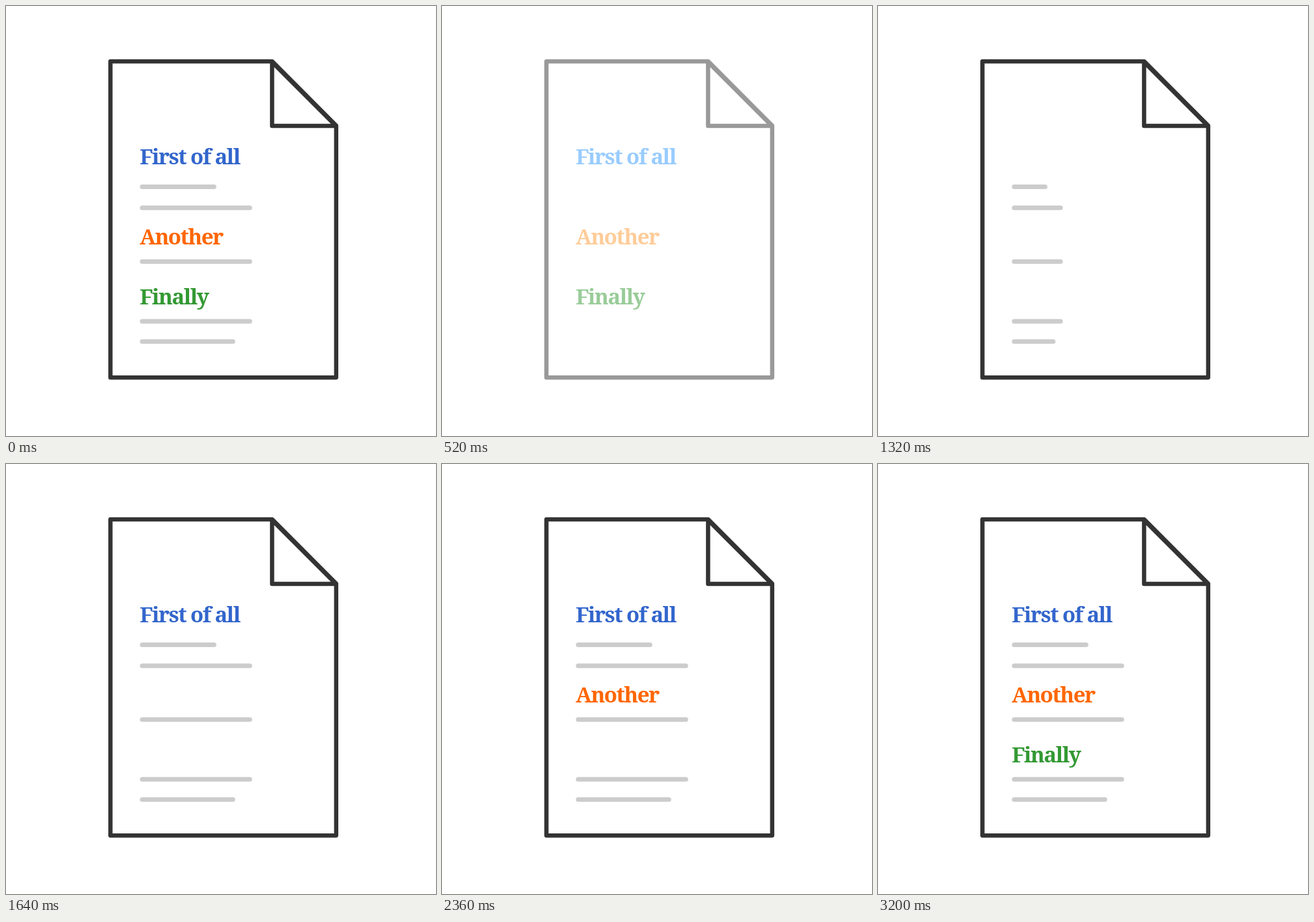
Recreate the animation shown at these times as an HTML page. Size 660 px wide and 660 px high, loop 5080 ms.

```html
<!DOCTYPE html>
<html lang="en">
<head>
<meta charset="utf-8">
<title>Document outline</title>
<style>
  html, body { margin: 0; width: 100%; height: 100%; overflow: hidden; background: #fff; }
  svg { display: block; width: 100%; height: 100%; }
  path { fill: none; stroke-linecap: round; stroke-linejoin: round; }
  text { font: 700 33px "Roboto Slab", "Noto Serif", serif; letter-spacing: -1.6px; }
</style>
</head>
<body>
<svg id="stage" viewBox="0 0 660 660"></svg>
<script>
const LOOP = 5080, STEP = 40;
const FADE_OUT = [280, 680], DRAW = [680, 1140], RULES = [1140, 1535];
const FADE_IN = 280;
const INK = [51, 51, 51], GREY = [204, 204, 204];

const stage = document.getElementById("stage");

function add(tag, attrs) {
  const el = document.createElementNS("http://www.w3.org/2000/svg", tag);
  for (const key in attrs) el.setAttribute(key, attrs[key]);
  return stage.appendChild(el);
}

function stroke(d, width, color, span) {
  const el = add("path", { d, "stroke-width": width });
  return { el, color, span, length: el.getTotalLength() };
}

const strokes = [
  stroke("M160.3 86.2V570.3H506.8V183.6L408.4 84.9H160.3V86.2", 6.5, INK, DRAW),
  stroke("M420.6 98.2L408.4 86V184H506.4L420.6 98.2", 6.5, INK, DRAW),
  ...[[277.5, 319.3], [309.8, 374.3], [392.3, 374.3], [484, 374.3], [515, 348.3]]
    .map(([y, end]) => stroke(`M209 ${y}H${end}`, 7, GREY, RULES))
];

const headings = [
  ["First of all", 243.3, [51, 102, 204], 1360],
  ["Another", 365.7, [255, 102, 0], 2080],
  ["Finally", 457.6, [51, 153, 51], 2920]
].map(([label, y, color, start]) => {
  const el = add("text", { x: 205.2, y });
  el.textContent = label;
  return { el, color, start };
});

const progress = (t, [from, to]) => Math.min(1, Math.max(0, (t - from) / (to - from)));
const ease = u => (1 - Math.cos(Math.PI * u)) / 2;

// Blend with white, limited to six levels per channel.
function tint(color, alpha) {
  const levels = color.map(c => Math.round((255 + (c - 255) * alpha) / 51) * 51);
  return `rgb(${levels})`;
}

function render(time) {
  const t = Math.floor((time % LOOP) / STEP) * STEP;
  const leaving = t < FADE_OUT[1];
  const fade = 1 - progress(t, FADE_OUT);

  for (const { el, color, span, length } of strokes) {
    const shown = leaving ? 1 : ease(progress(t, span));
    el.style.visibility = shown > 0 ? "visible" : "hidden";
    el.style.stroke = tint(color, leaving ? fade : 1);
    el.style.strokeDasharray = shown < 1 ? `${shown * length} ${length + 20}` : "none";
  }

  for (const { el, color, start } of headings) {
    const alpha = leaving ? fade : progress(t, [start, start + FADE_IN]);
    el.style.visibility = alpha > 0 ? "visible" : "hidden";
    el.style.fill = tint(color, alpha);
  }
}

const begin = performance.now();
function tick() {
  render(performance.now() - begin);
  requestAnimationFrame(tick);
}
tick();
</script>
</body>
</html>
```
